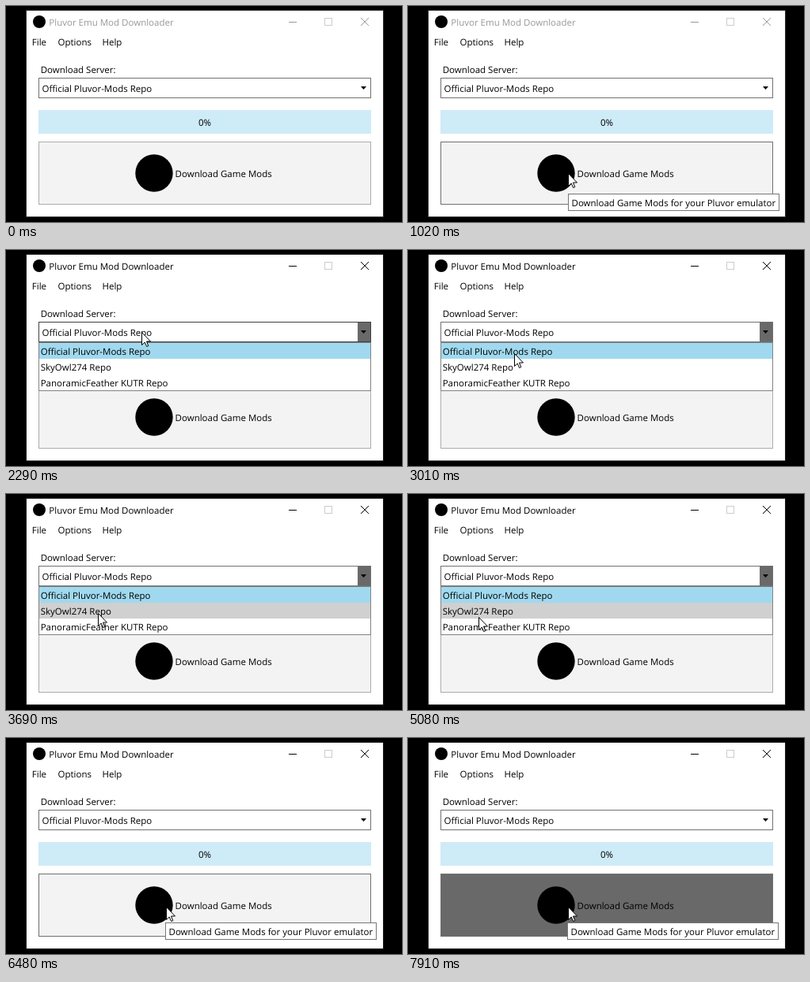
These frames come from a looping animation (500 by 274 pixels, 8000 ms). An HTML page with a canvas:

```html
<!DOCTYPE html>
<html lang="en">
<head>
<meta charset="utf-8">
<title>Mod Downloader</title>
<style>
  html, body { margin: 0; width: 100%; height: 100%; overflow: hidden; background: #000; }
  canvas { display: block; width: 500px; height: 274px; }
</style>
</head>
<body>
<canvas id="stage"></canvas>
<script>
const W = 500, H = 274, LOOP = 8000;
const canvas = document.getElementById('stage');
const ctx = canvas.getContext('2d');
const ratio = window.devicePixelRatio || 1;
canvas.width = Math.round(W * ratio);
canvas.height = Math.round(H * ratio);

const FONT = '11.5px "Open Sans", "Noto Sans", sans-serif';
const REPOS = ['Official Pluvor-Mods Repo', 'SkyOwl274 Repo', 'PanoramicFeather KUTR Repo'];

// Shared layout: one column of controls
const LEFT = 41, WIDE = 420;
const combo = { y: 91, h: 26 };
const bar = { y: 132, h: 30 };
const button = { y: 172, h: 80 };
const ROW = 20;
const list = { y: combo.y + combo.h, h: REPOS.length * ROW + 2 };

// When things happen, in ms
const ENTER = 500, ACTIVATE = 2080, OPEN = 2090, SLIDE = 160;
const CLOSE = 5730, RELEASE = 5760, PRESS = 7910;
const TIPS = [{ from: 990, x: 202, y: 238 }, { from: 6480, x: 201, y: 234 }];

// Pointer moves: start, duration, destination; it rests in between
const ENTRY = { x: 222, y: 266 };
const MOVES = [
  [ENTER, 330, 203, 218],
  [990, 700, 187, 126],
  [1690, 140, 174, 100],
  [ACTIVATE, 210, 171, 104],
  [2290, 130, 169, 110],
  [2810, 450, 115, 143],
  [3560, 130, 116, 151],
  [3690, 320, 71, 152],
  [4210, 230, 75, 173],
  [4990, 150, 92, 152],
  [5280, 100, 110, 128],
  [5910, 180, 202, 214]
];

const clamp = v => Math.max(0, Math.min(1, v));
const easeOut = k => Math.sin(k * Math.PI / 2);
const over = (pointer, area) => !!pointer && pointer.y >= area.y && pointer.y < area.y + area.h;

function pointerAt(t) {
  if (t < ENTER) return null;
  let { x, y } = ENTRY;
  for (const [start, ms, toX, toY] of MOVES) {
    const k = easeOut(clamp((t - start) / ms));
    x += (toX - x) * k;
    y += (toY - y) * k;
  }
  return { x: Math.round(x), y: Math.round(y) };
}

function fill(x, y, w, h, color) {
  ctx.fillStyle = color;
  ctx.fillRect(x, y, w, h);
}

function box(x, y, w, h, bg, border) {
  fill(x, y, w, h, border);
  fill(x + 1, y + 1, w - 2, h - 2, bg);
}

function text(str, x, y, color = '#000', align = 'left') {
  ctx.fillStyle = color;
  ctx.textAlign = align;
  ctx.fillText(str, x, y);
}

function dot(x, y, r) {
  ctx.fillStyle = '#000';
  ctx.beginPath();
  ctx.arc(x, y, r, 0, Math.PI * 2);
  ctx.fill();
}

function line(color, x0, y0, x1, y1) {
  ctx.strokeStyle = color;
  ctx.lineWidth = 1;
  ctx.beginPath();
  ctx.moveTo(x0, y0);
  ctx.lineTo(x1, y1);
  ctx.stroke();
}

function drawWindow(active) {
  const ink = active ? '#000' : '#999';
  fill(0, 0, W, H, '#000');
  box(25, 5, 452, 263, '#fff', active ? '#181818' : '#303030');
  dot(42, 20, 8);
  text('Pluvor Emu Mod Downloader', 54.3, 24.5, ink);
  line(ink, 357, 20.5, 367, 20.5);
  ctx.strokeStyle = '#ccc';
  ctx.strokeRect(402.5, 15.5, 9, 9);
  line(ink, 448, 15, 458, 25);
  line(ink, 458, 15, 448, 25);
  text('File', 32.8, 50);
  text('Options', 65.5, 50);
  text('Help', 121.5, 50);
  text('Download Server:', 43.7, 85);
}

function drawCombo(open, hover) {
  box(LEFT, combo.y, WIDE, combo.h, '#fff', hover ? '#404040' : '#707070');
  if (open) fill(444, combo.y + 1, 16, combo.h - 2, '#696969');
  text(REPOS[0], 45.5, 109);
  ctx.fillStyle = '#000';
  ctx.beginPath();
  ctx.moveTo(448, 102);
  ctx.lineTo(455, 102);
  ctx.lineTo(451.5, 106);
  ctx.fill();
}

function drawBar() {
  fill(LEFT, bar.y, WIDE, bar.h, '#ceebf8');
  text('0%', LEFT + WIDE / 2, 152, '#000', 'center');
}

function drawButton(hover, pressed) {
  box(LEFT, button.y, WIDE, button.h, pressed ? '#696969' : '#f3f3f3', hover ? '#707070' : '#acacac');
  dot(187, 212, 23.7);
  text('Download Game Mods', 213.6, 217);
}

function drawList(t, pointer) {
  const hidden = 1 - clamp((t - OPEN) / SLIDE);
  ctx.save();
  ctx.beginPath();
  ctx.rect(LEFT, list.y, WIDE, list.h);
  ctx.clip();
  ctx.translate(0, -Math.round(list.h * hidden));
  box(LEFT, list.y, WIDE, list.h, '#fff', '#828282');
  REPOS.forEach((name, i) => {
    const row = { y: list.y + 1 + i * ROW, h: ROW };
    const bg = i === 0 ? '#a0d9ef' : over(pointer, row) ? '#d0d0d0' : '#fff';
    fill(LEFT + 1, row.y, WIDE - 2, ROW, bg);
    text(name, 43.7, row.y + 15);
  });
  ctx.restore();
}

function drawTip({ x, y }) {
  box(x, y, 267, 22, '#fff', '#767676');
  text('Download Game Mods for your Pluvor emulator', x + 4.5, y + 16);
}

function drawPointer({ x, y }) {
  ctx.save();
  ctx.translate(x + .5, y + .5);
  const arrow = new Path2D('M0 0V16L3.7 12.5 6.2 18 8.3 17.1 6 11.5H11Z');
  ctx.fillStyle = '#fff';
  ctx.fill(arrow);
  ctx.strokeStyle = '#000';
  ctx.lineWidth = 1;
  ctx.stroke(arrow);
  ctx.restore();
}

function draw(t) {
  const pointer = pointerAt(t);
  const listOpen = t >= OPEN && t < CLOSE;
  const overButton = !listOpen && over(pointer, button);
  const tip = TIPS.filter(({ from }) => t >= from).pop();

  ctx.setTransform(ratio, 0, 0, ratio, 0, 0);
  ctx.font = FONT;
  ctx.textRendering = 'geometricPrecision';
  drawWindow(t >= ACTIVATE);
  drawCombo(t >= OPEN && t < RELEASE, over(pointer, combo));
  drawBar();
  drawButton(overButton, t >= PRESS);
  if (listOpen) drawList(t, pointer);
  // The second visit to the button waits for its own tip
  if (tip && overButton && (t < ACTIVATE || t >= TIPS[1].from)) drawTip(tip);
  if (pointer) drawPointer(pointer);
}

const start = performance.now();
function tick() {
  draw((performance.now() - start) % LOOP);
  requestAnimationFrame(tick);
}
tick();
</script>
</body>
</html>
```
